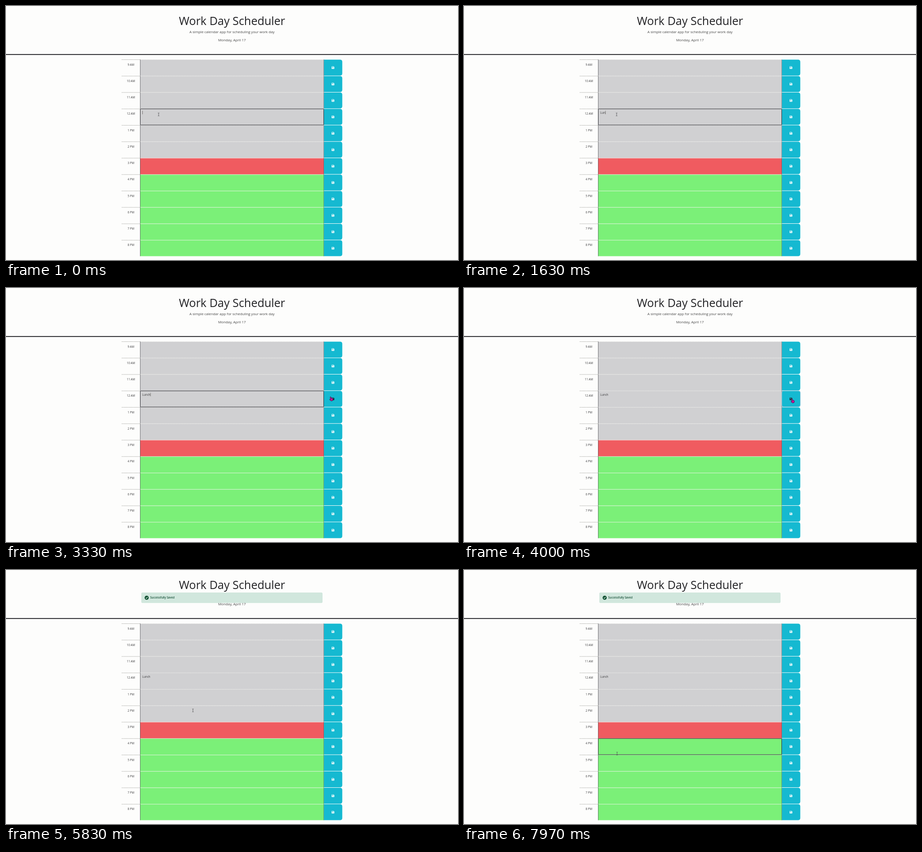
Animation of 998 by 561 pixels, one loop 8000 ms. Source, as an HTML page:

```html
<!DOCTYPE html>
<html lang="en">
<head>
<meta charset="utf-8">
<title>Work Day Scheduler</title>
<style>
  html, body { margin: 0; width: 100%; height: 100%; overflow: hidden; background: #fdfdfc; }
  svg { display: block; width: 998px; height: 561px; }
  text { font-family: "Open Sans", sans-serif; font-size: 6.24px; fill: #3a3a3c; }
  .mid { text-anchor: middle; }
  .title { font-size: 24.96px; fill: #212124; }
  .lead { font-size: 7.8px; fill: #444; }
</style>
</head>
<body>
<svg viewBox="0 0 998 561">
  <defs>
    <path id="save" fill-rule="evenodd" d="M.7 0H4.3L5.8 1.5V5.1Q5.8 5.8 5.1 5.8H.7Q0 5.8 0 5.1V.7Q0 0 .7 0ZM.9 .9V2.3H3.9V.9ZM2.9 3.2A.85 .85 0 1 0 2.9 4.9A.85 .85 0 1 0 2.9 3.2Z"/>
  </defs>
  <text class="mid title" x="499" y="42.4">Work Day Scheduler</text>
  <text class="mid lead" x="499" y="60.2">A simple calendar app for scheduling your work day</text>
  <text class="mid lead" x="499" y="78.3">Monday, April 17</text>
  <rect y="106.2" width="998" height="1.9" fill="#222226"/>
  <g id="rows"></g>
  <text id="entry" x="301" y="237.7" fill="#444"></text>
  <rect id="focus" x="296.5" width="405" height="35.6" rx="1" fill="none" stroke="#29292f"/>
  <rect id="caret" width=".7" height="7.6" fill="#55504c"/>
  <rect id="ring" x="701.7" y="227" width="41" height="35.6" rx="4" fill="none" stroke="#9cc9dc"/>
  <g id="alert">
    <rect x="299.3" y="50.3" width="399" height="22" rx="1.5" fill="#d1e7dd" stroke="#bcdccf" stroke-width=".6"/>
    <circle cx="310.6" cy="61.2" r="4.5" fill="#0f5132"/>
    <path d="M308.5 61.4l1.5 1.5 2.8-3.3" fill="none" stroke="#d9ece3" stroke-width="1.1"/>
    <text x="318.2" y="63.4" style="fill:#0f4a30" stroke="#0f4a30" stroke-width=".12">Successfully Saved</text>
  </g>
  <path id="beam" d="M-1.6-3.4Q0-3.4 0-2.6Q0-3.4 1.6-3.4M0-2.8V2.8M-1.6 3.4Q0 3.4 0 2.6Q0 3.4 1.6 3.4" fill="none" stroke="#4c4c50" stroke-width=".8"/>
  <path id="hand" d="M-.6 0Q.3-.7 .9 .3L1.8 2.8L4.5 3.6Q5.6 4 5.4 5.3L4.7 8.2L1.6 9L-1.8 6.5Q-2.6 5.5-1.4 5.1L.3 5.4L-.9 1Z" fill="#d0119b" stroke="#3a1038" stroke-width=".8"/>
</svg>
<script>
const LOOP = 8000, TOP = 118.2, PITCH = 36.25, NOON = 3, FOUR = 6 + 1;
const $ = id => document.getElementById(id);
const rowTop = i => TOP + i * PITCH;
const hours = ['9 AM', '10 AM', '11 AM', '12 AM', '1 PM', '2 PM', '3 PM', '4 PM', '5 PM', '6 PM', '7 PM', '8 PM'];
const slotColor = i => i < 6 ? '#d0d0d2' : i === 6 ? '#f05b60' : '#7bf078';

$('rows').innerHTML = hours.map((hour, i) => {
  const y = rowTop(i), bottom = y + PITCH;
  const dash = i < 6 ? 'stroke-dasharray="1.6 .8"' : '';
  return `
    <path d="M255.5 ${y + .3}H296" stroke="#85857f" stroke-width=".7" stroke-dasharray="1.5 .7"/>
    <text class="mid" x="275.8" y="${y + 13.3}">${hour}</text>
    <rect x="296" y="${y}" width="406" height="${i === 11 ? 35.6 : PITCH}" fill="${slotColor(i)}"/>
    <path d="M297 ${y + .3}H701.5" stroke="#f4f4f0" stroke-width=".8" ${dash}/>
    <path d="M296.4 ${y}V${bottom - .6}M701.8 ${y}V${bottom - .6}" stroke="#45454a" stroke-width=".7"/>
    <path d="M702.1 ${y + .2}H737.5Q742.5 ${y + .2} 742.5 ${y + 5.2}V${bottom - 5.6}Q742.5 ${bottom - .6} 737.5 ${bottom - .6}H702.1Z" fill="#15b9d1"/>
    <use id="icon${i}" href="#save" x="719" y="${y + 15}" fill="#fff"/>`;
}).join('');

// Pointer path: [time, x, y]
const route = [
  [0, 337, 239.5], [2450, 337, 239.5], [3270, 716.5, 240.5], [3400, 716.5, 240.5],
  [3750, 724, 245], [5100, 724, 245], [5800, 413, 310], [5900, 412, 310.5],
  [6500, 338, 405.5], [LOOP, 338, 405.5]
];
const keyTimes = [1050, 1300, 1550, 1750, 1950];
const NOON_BLUR = 3900, ALERT_AT = 4950, RING_END = 5150, FOUR_FOCUS = 7250;

function pointerAt(t) {
  const k = route.findIndex(p => p[0] > t);
  const [t0, x0, y0] = route[k - 1], [t1, x1, y1] = route[k];
  const u = (t - t0) / (t1 - t0), e = u * u * (3 - 2 * u);
  return [x0 + (x1 - x0) * e, y0 + (y1 - y0) * e];
}

const show = (id, on) => $(id).setAttribute('visibility', on ? 'visible' : 'hidden');

function draw(t) {
  const typed = keyTimes.filter(k => t >= k).length;
  $('entry').textContent = 'Lunch'.slice(0, typed);

  const noon = t < NOON_BLUR, four = t >= FOUR_FOCUS;
  const focusY = rowTop(noon ? NOON : FOUR);
  $('focus').setAttribute('y', focusY + .3);
  show('focus', noon || four);

  const blinkStart = four ? FOUR_FOCUS : typed ? keyTimes[typed - 1] : 50;
  $('caret').setAttribute('x', 301 + (noon && typed ? $('entry').getComputedTextLength() : 0));
  $('caret').setAttribute('y', focusY + 4.6);
  show('caret', (noon || four) && (t < blinkStart || (t - blinkStart) % 1000 < 500));

  show('ring', t >= NOON_BLUR && t < RING_END);
  show('alert', t >= ALERT_AT);

  const [x, y] = pointerAt(t), hover = x > 702;
  for (const id of ['beam', 'hand']) $(id).setAttribute('transform', `translate(${x} ${y})`);
  show('beam', !hover);
  show('hand', hover);
  $('icon' + NOON).setAttribute('fill', hover ? '#1c2126' : '#fff');
}

const start = performance.now();
function tick() {
  draw((performance.now() - start) % LOOP);
  requestAnimationFrame(tick);
}
tick();
</script>
</body>
</html>
```
